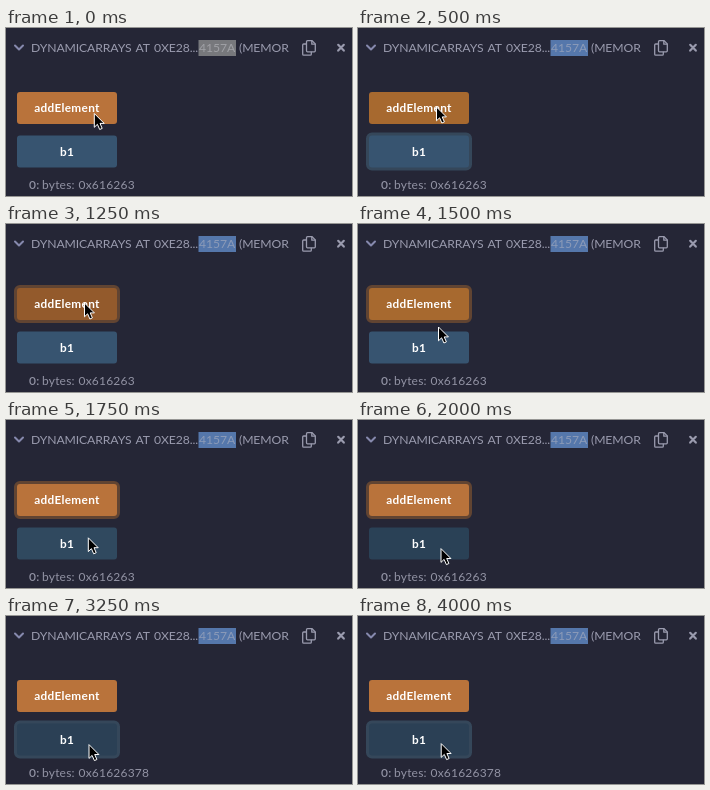
Animation, 346 px wide and 168 px high, one loop 4.5 s. Source, as an HTML page:

```html
<!DOCTYPE html>
<html lang="en">
<head>
<meta charset="utf-8">
<title>Contract panel</title>
<style>
  html, body { margin: 0; width: 100%; height: 100%; overflow: hidden; background: #252636; }
  svg { display: block; width: 346px; height: 168px; }
  text { font-family: Lato, "Open Sans", sans-serif; font-size: 12px; letter-spacing: .2px; fill: #9293a4; }
  .title text { font-size: 12.2px; letter-spacing: -.1px; fill: #9a9bae; }
  .label { font-size: 11.8px; letter-spacing: .3px; font-weight: 700; fill: #fff; text-anchor: middle; }
  .line { fill: none; stroke: #9a9bae; stroke-linecap: round; stroke-linejoin: round; }
  .button { paint-order: stroke; stroke-linejoin: round; }
</style>
</head>
<body>
<svg viewBox="0 0 346 168">
  <rect width="346" height="168" fill="#252636"/>
  <path class="line" style="stroke:#8689ad" stroke-width="2" d="M9 17.5l4 4 4-4"/>
  <g class="title">
    <rect id="mark" x="192.5" y="12" width="37.5" height="16"/>
    <text x="25" y="24.3">DYNAMICARRAYS</text>
    <text x="129.5" y="24.3">AT</text>
    <text x="148" y="24.3">0XE28...</text>
    <text id="marked" x="193" y="24.3">4157A</text>
    <text x="233" y="24.3">(MEMOR</text>
  </g>
  <g class="line" stroke-width="1.3">
    <path d="M301.5 12.7h4.6l3.2 3.2v6.9a1 1 0 0 1-1 1h-6.8a1 1 0 0 1-1-1v-9.1a1 1 0 0 1 1-1z"/>
    <path d="M305.8 13v3.2h3.2M300 16h-2.3a1 1 0 0 0-1 1v9.2a1 1 0 0 0 1 1h6.6a1 1 0 0 0 1-1v-2"/>
  </g>
  <path class="line" stroke-width="2.2" d="M332.2 16.8l5.6 5.8m0-5.8l-5.6 5.8"/>

  <rect id="add" class="button" x="11" y="64" width="100" height="32" rx="3" stroke="#614432"/>
  <text class="label" x="61" y="84.2">addElement</text>
  <rect id="read" class="button" x="11" y="107.5" width="100" height="32" rx="3" stroke="#35475a"/>
  <text class="label" x="61" y="127.6">b1</text>

  <text x="23" y="161.3" font-weight="600">0:</text>
  <text x="36" y="161.3">bytes:</text>
  <text id="value" x="72.5" y="161.3"></text>

  <path id="cursor" d="M0 0V13.8L3.1 10.8L5.4 16L7.9 14.9L5.7 9.9H9.9Z"
        fill="#000" stroke="#fff" stroke-linejoin="round"/>
</svg>
<script>
const LOOP = 4500;
const $ = id => document.getElementById(id);

// Each track lists [start in ms, value]; ring values are widths in px.
const tracks = {
  cursor: [[0, [88.3, 85.5]], [250, [78.5, 79]], [1500, [80.5, 103]], [1750, [82.3, 117.8]],
           [2000, [83, 128.6]], [3500, [83.2, 127.6]]],
  add: [[0, "#b9733b"], [250, "#a7692f"], [750, "#9b6030"], [1250, "#935a2c"],
        [1500, "#a7692f"], [1750, "#b9733b"]],
  addRing: [[0, 0], [1250, 3], [2500, 1], [2750, 0]],
  read: [[0, "#375470"], [1750, "#30495f"], [2000, "#2a4156"], [2500, "#283d50"], [2750, "#2b4055"]],
  readRing: [[0, 0], [500, 3], [1250, 0], [2500, 2], [2750, 3]],
  value: [[0, "0x616263"], [2750, "0x61626378"]],
  mark: [[0, ["#77787c", "#a0a1a6"]], [250, ["#5577ab", "#8c9bb8"]]]
};

const at = (name, t) => tracks[name].findLast(step => step[0] <= t)[1];

function draw(t) {
  const [x, y] = at("cursor", t);
  $("cursor").setAttribute("transform", `translate(${x} ${y})`);
  for (const id of ["add", "read"]) {
    $(id).style.fill = at(id, t);
    $(id).style.strokeWidth = 2 * at(id + "Ring", t);
  }
  const [back, ink] = at("mark", t);
  $("mark").style.fill = back;
  $("marked").style.fill = ink;
  $("value").textContent = at("value", t);
}

const start = performance.now();
function tick(now) {
  draw(Math.max(0, now - start) % LOOP);
  requestAnimationFrame(tick);
}
draw(0);
requestAnimationFrame(tick);
</script>
</body>
</html>
```
